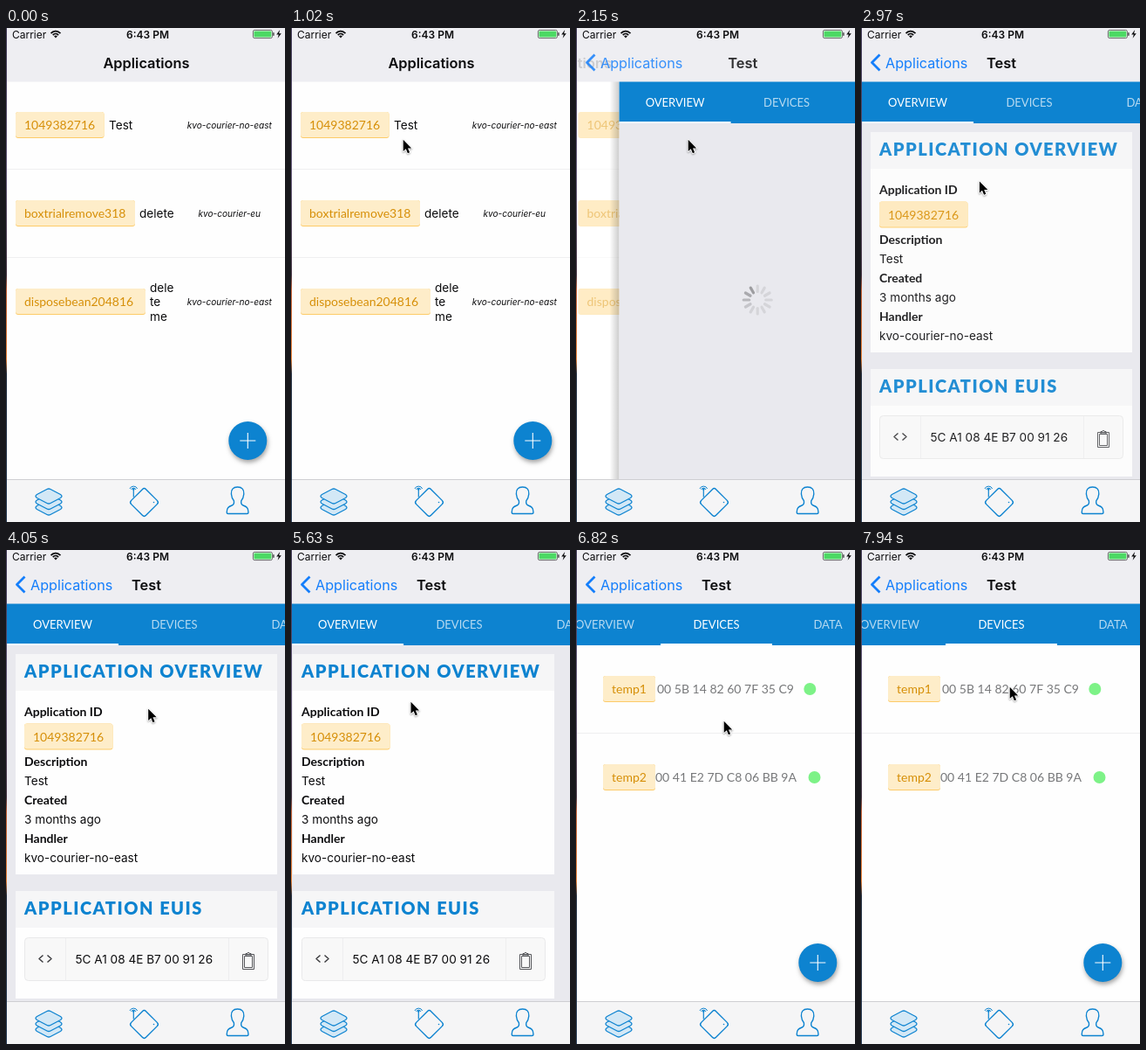
An HTML page with a canvas for the animation above (8 s loop, 320 by 565 pixels).

```html
<!DOCTYPE html>
<html lang="en">
<head>
<meta charset="utf-8">
<title>Applications</title>
<style>
html, body { margin: 0; width: 100%; height: 100%; overflow: hidden; background: #fff; }
canvas { display: block; width: 320px; height: 565px; }
</style>
</head>
<body>
<canvas id="stage"></canvas>
<script>
const W = 320, H = 565, LOOP = 8000;
const BLUE = '#0d83d0', LINK = '#147efb', GREY = '#e9e9ee', INK = '#0c0c0e';
const UI = 'Inter, "Liberation Sans", sans-serif', LATO = 'Lato, "Open Sans", sans-serif';
const canvas = document.getElementById('stage');
const ctx = canvas.getContext('2d');
const dpr = window.devicePixelRatio || 1;
canvas.width = W * dpr;
canvas.height = H * dpr;

const APP_ID = '1049382716', HANDLER = 'kvo-courier-no-east';

// Key points: time, then values
const SWIPE = [[5560, 0], [5630, .026], [5760, .3], [5880, .72], [5980, .93], [6100, .9875], [6200, 1]];
const POINTER = [
  [500, -14, 160], [560, 0, 160], [700, 42, 157], [850, 95, 140], [1020, 128, 127],
  [2860, 128, 127], [3030, 139, 200], [3450, 139, 200], [3570, 142, 200], [3750, 143, 200],
  [3930, 143, 200], [4050, 162.5, 181], [4290, 166, 163], [4460, 166, 163], [4980, 171, 94],
  [5220, 170, 130], [5400, 160, 165], [5560, 147, 171], [5630, 137.5, 173], [5760, 50, 180],
  [5840, -20, 182], [6180, -20, 200], [6400, 150, 199], [6470, 169, 195], [7300, 169, 195],
  [7940, 170, 156]
];

const clamp = v => Math.max(0, Math.min(1, v));

function sample(keys, t) {
  if (t <= keys[0][0]) return keys[0].slice(1);
  for (let i = 1; i < keys.length; i++) {
    const a = keys[i - 1], b = keys[i];
    if (t < b[0]) {
      const k = (t - a[0]) / (b[0] - a[0]);
      return a.slice(1).map((v, j) => v + (b[j + 1] - v) * k);
    }
  }
  return keys[keys.length - 1].slice(1);
}

// Cubic bezier easing solved by bisection
function pushEase(x) {
  if (x <= 0 || x >= 1) return clamp(x);
  const curve = (s, a, b) => 3 * (1 - s) * (1 - s) * s * a + 3 * (1 - s) * s * s * b + s * s * s;
  let lo = 0, hi = 1;
  for (let i = 0; i < 24; i++) {
    const mid = (lo + hi) / 2;
    if (curve(mid, .2833, .31833) < x) lo = mid; else hi = mid;
  }
  return curve(lo, .99, .99);
}

function group(x, alpha, draw) {
  ctx.save();
  ctx.translate(x, 0);
  ctx.globalAlpha *= alpha;
  draw();
  ctx.restore();
}

function rect(x, y, w, h, color) {
  ctx.fillStyle = color;
  ctx.fillRect(x, y, w, h);
}

function round(x, y, w, h, r, fill, line) {
  ctx.beginPath();
  ctx.roundRect(x, y, w, h, r);
  if (fill) { ctx.fillStyle = fill; ctx.fill(); }
  if (line) { ctx.strokeStyle = line; ctx.stroke(); }
}

function disc(x, y, r, color) {
  ctx.beginPath();
  ctx.arc(x, y, r, 0, 7);
  ctx.fillStyle = color;
  ctx.fill();
}

function shape(d, line, width, fill) {
  const p = new Path2D(d);
  if (fill) { ctx.fillStyle = fill; ctx.fill(p); }
  if (line) { ctx.strokeStyle = line; ctx.lineWidth = width; ctx.stroke(p); }
}

function text(str, x, y, font, color, align = 'left', spacing = 0) {
  ctx.font = font;
  ctx.letterSpacing = spacing + 'px';
  ctx.textAlign = align;
  ctx.fillStyle = color;
  ctx.fillText(str, x, y);
}

const body = (str, x, y) => text(str, x, y, '13.6px ' + UI, INK);
const label = (str, x, y) => text(str, x, y, '700 14px ' + LATO, INK);

function badge(str, x, y, w) {
  round(x, y, w, 30, 3, '#fdcb68');
  round(x, y, w, 29, 3, '#feedc9');
  text(str, x + 10, y + 20, '14px ' + LATO, '#d68f08');
}

function fab(x, y) {
  ctx.save();
  ctx.shadowColor = 'rgba(0,0,0,.35)';
  ctx.shadowBlur = 5 * dpr;
  ctx.shadowOffsetX = dpr;
  ctx.shadowOffsetY = 3 * dpr;
  disc(x, y, 22, BLUE);
  ctx.restore();
  shape(`M${x - 9} ${y}h18M${x} ${y - 9}v18`, '#fff', 1.1);
}

function spinner(x, y, head) {
  ctx.save();
  ctx.translate(x, y);
  ctx.lineCap = 'round';
  ctx.lineWidth = 3.2;
  for (let i = 0; i < 12; i++) {
    const age = (((head - i) % 12) + 12) % 12;
    const a = i * Math.PI / 6 - Math.PI / 2;
    ctx.strokeStyle = `rgba(110,110,112,${Math.max(.16, .62 - age * .11)})`;
    ctx.beginPath();
    ctx.moveTo(Math.cos(a) * 9.5, Math.sin(a) * 9.5);
    ctx.lineTo(Math.cos(a) * 16, Math.sin(a) * 16);
    ctx.stroke();
  }
  ctx.restore();
}

function appList() {
  rect(0, 61, W, 455, '#fefefe');
  rect(0, 161, W, 1, '#efeff0');
  rect(0, 262, W, 1, '#efeff0');
  badge(APP_ID, 10, 96, 101.5);
  badge('boxtrialremove318', 10, 197, 137);
  badge('disposebean204816', 10, 298, 149);
  body('Test', 117, 116);
  body('delete', 152, 217);
  ['dele', 'te', 'me'].forEach((s, i) => body(s, 164, 301.5 + i * 16.8));
  [HANDLER, 'kvo-courier-eu', HANDLER].forEach((s, i) =>
    text(s, 255.3, 115 + i * 101, 'italic 10.1px ' + UI, INK, 'center'));
  fab(276.3, 472);
}

function card(title, y, h) {
  rect(10, y, 300, h, '#fefefe');
  rect(10, y, 300, 42, '#f6f6f7');
  text(title, 20, y + 27, '900 20px ' + LATO, BLUE, 'left', 1.5);
}

function overview() {
  card('APPLICATION OVERVIEW', 119, 252);
  label('Application ID', 20, 190);
  badge(APP_ID, 20, 198.5, 101.5);
  label('Description', 20, 247);
  body('Test', 20, 269);
  label('Created', 20, 291);
  body('3 months ago', 20, 313);
  label('Handler', 20, 335);
  body(HANDLER, 20, 357);
  card('APPLICATION EUIS', 390, 123);
  ctx.lineWidth = 1;
  round(20.5, 443.5, 279, 49, 4, '#f8f8f8', '#e9e9ea');
  rect(67, 444, 1, 48, '#eeeeef');
  rect(254, 444, 1, 48, '#eeeeef');
  shape('M41.5 463.5l-4.5 4 4.5 4M46.5 463.5l4.5 4-4.5 4', '#3c3c3f', 1.5);
  body('5C A1 08 4E B7 00 91 26', 78.5, 473);
  shape('M270.5 462.5h13v17h-13zM272.5 464.5h9v13h-9zM274 464v-2.5h1.8a1.2 1.2 0 0 1 2.4 0h1.8v2.5z', '#55565a', 1);
}

function device(name, eui, y, x, dot) {
  badge(name, 30, y, 60);
  text(eui, x, y + 20, '14px ' + LATO, '#77787a');
  disc(dot, y + 15, 7, '#7df287');
}

function devices(t) {
  rect(0, 109, W, 407, '#fefefe');
  if (t < 6300) {
    spinner(158.7, 311, 2 + Math.floor((t - 6100) / 83));
  } else {
    device('temp1', '00 5B 14 82 60 7F 35 C9', 144, 92, 267.3);
    device('temp2', '00 41 E2 7D C8 06 BB 9A', 245, 90, 272.5);
    rect(0, 209, W, 1, '#efeff0');
  }
  fab(276.3, 472);
}

function tabs(page, bar, scroll) {
  rect(0, 61, W, 48, BLUE);
  const active = page < .5 ? 0 : 1;
  ['OVERVIEW', 'DEVICES', 'DATA'].forEach((s, i) =>
    text(s, 64 + i * 128 - 32 * scroll, 90, '13px ' + LATO,
      i === active ? '#fff' : 'rgba(255,255,255,.7)', 'center'));
  rect(128 * bar - 32 * scroll, 107, 128, 2, '#fff');
}

function detail(t) {
  const page = sample(SWIPE, t)[0];
  rect(0, 61, W, 455, GREY);
  group(-W * page, 1, () => {
    if (t < 2700) spinner(158.7, 311, 11 + Math.floor((t - 2150) / 83));
    else group(0, .5 + .5 * clamp((t - 2700) / 330), overview);
  });
  if (page > .1) group(W * (1 - page), 1, () => devices(t));
  tabs(page, sample(SWIPE, t - 70)[0], sample(SWIPE, t - 130)[0]);
}

function edgeShadow(x) {
  const g = ctx.createLinearGradient(x - 11, 0, x, 0);
  g.addColorStop(0, 'rgba(0,0,0,0)');
  g.addColorStop(1, 'rgba(0,0,0,.2)');
  rect(x - 11, 61, 11, 455, g);
}

function header(push) {
  rect(0, 0, W, 61.5, '#eeeef2');
  const title = '600 16.4px ' + UI;
  group(-200 * push, 1 - push, () => text('Applications', 161, 45.5, title, INK, 'center'));
  group(200 * (1 - push), push, () => text('Test', 161, 45.5, title, INK, 'center'));
  group(0, push, () => {
    shape('M21.5 30.5L12.5 39.5L21.5 48.5', LINK, 2.8);
    text('Applications', 28, 45.5, '16.2px ' + UI, LINK);
  });
  text('Carrier', 7, 11.5, '12px ' + UI, INK);
  text('6:43 PM', 162.5, 11.5, '600 12px ' + UI, INK, 'center');
  ctx.lineWidth = 1.7;
  ctx.strokeStyle = INK;
  [4.3, 7.3].forEach(r => {
    ctx.beginPath();
    ctx.arc(57, 11, r, -Math.PI * .77, -Math.PI * .23);
    ctx.stroke();
  });
  shape('M57 11.5l-2-2.2q2-1.6 4 0z', null, 0, INK);
  ctx.lineWidth = .8;
  round(283.4, 2.4, 22, 9.2, 1.8, '#fff', '#444');
  round(284.4, 3.4, 20, 7.2, 1, '#4cd964');
  rect(306.2, 5.2, 1.4, 3.6, '#444');
  shape('M314.2 2l-4 5.6h2.6l-1.2 4.2 4.2-5.6h-2.7z', null, 0, INK);
}

function tabBar() {
  rect(0, 516, W, 49, '#f5f5f6');
  rect(0, 516, W, 1, '#cfcfd2');
  ctx.lineJoin = 'round';
  [548.5, 542, 535.5].forEach(y =>
    shape(`M47 ${y - 8}q2-1 4 0L62.5 ${y - 2}q3 2 0 4L51 ${y + 8}q-2 1-4 0L35.5 ${y + 2}q-3-2 0-4z`,
      BLUE, 1.3, '#d3e8f6'));

  ctx.save();
  ctx.translate(158.5, 542.5);
  ctx.rotate(Math.PI / 4);
  ctx.lineWidth = 1.4;
  round(-12, -12, 24, 24, 3, null, BLUE);
  ctx.restore();
  disc(169.5, 542.5, .8, BLUE);
  shape('M146.3 527.5v9', BLUE, 1.2);
  disc(146.3, 527.5, 1.2, BLUE);
  shape('M143.6 528a2.9 2.9 0 0 1 5.4 0M141.9 527a4.8 4.8 0 0 1 8.8 0', BLUE, 1);

  shape('M265.6 525c-5.2 0-7.6 3-7.2 8c.3 3.2 1.2 5.8 3 7.8c.5 3 .2 4.2-2.2 5.2c-3.8 1.5-6 2.6-6 8q0 1.5 1.6 1.5h21.6q1.6 0 1.6-1.5c0-5.4-2.2-6.5-6-8c-2.4-1-2.7-2.2-2.2-5.2c1.8-2 2.7-4.6 3-7.8c.4-5-2-8-7.2-8z',
    BLUE, 1.4);
}

function desktopEdge() {
  const g = ctx.createLinearGradient(0, 0, 0, H);
  [[0, '#3a3350'], [.3, '#5b5070'], [.5, '#3d2c3c'], [.53, '#b9562c'],
   [.67, '#e07a30'], [.7, '#1b2638'], [1, '#223650']].forEach(s => g.addColorStop(...s));
  rect(0, 0, 1, H, g);
}

function pointer(t) {
  const [x, y] = sample(POINTER, t);
  ctx.save();
  ctx.translate(x, y);
  ctx.lineJoin = 'round';
  ctx.shadowColor = 'rgba(0,0,0,.35)';
  ctx.shadowBlur = 2 * dpr;
  ctx.shadowOffsetY = dpr;
  const d = 'M.7 .8V14L3.8 11.2L5.9 16.2L8.1 15.2L6 10.4H10.2z';
  shape(d, '#fff', 1.8);
  ctx.shadowColor = 'transparent';
  shape(d, null, 0, '#000');
  ctx.restore();
}

function draw(t) {
  ctx.setTransform(dpr, 0, 0, dpr, 0, 0);
  rect(0, 0, W, H, '#fefefe');
  const push = pushEase((t - 1985) / 500);
  const x = 1 + W * (1 - push);
  ctx.save();
  ctx.beginPath();
  ctx.rect(1, 61, W - 1, 455);
  ctx.clip();
  if (push < 1) group(1 - 10 * push, 1 - .7 * push, appList);
  if (push > 0) {
    if (push < 1) edgeShadow(x);
    group(x, 1, () => detail(t));
  }
  ctx.restore();
  header(push);
  tabBar();
  desktopEdge();
  pointer(t);
}

const start = performance.now();
function tick() {
  draw((performance.now() - start) % LOOP);
  requestAnimationFrame(tick);
}
tick();
</script>
</body>
</html>
```
